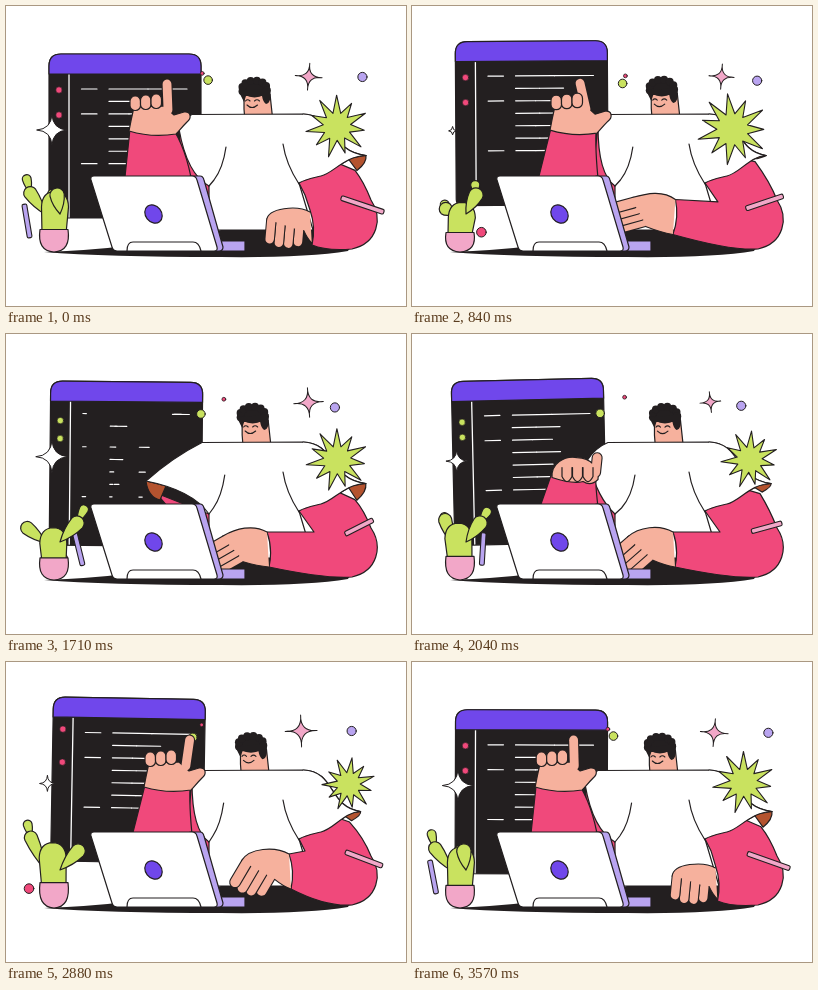
An HTML page that plays this animation: 400x300 px, repeating every 3600 ms.

```html
<!DOCTYPE html>
<html lang="en">
<head>
<meta charset="utf-8">
<title>Coder at a laptop</title>
<style>
html,body{margin:0;width:100%;height:100%;overflow:hidden;background:#fff}
svg{display:block;width:100vw;height:100vh}
</style>
</head>
<body>
<svg id="stage" viewBox="0 0 400 300" stroke-linejoin="round" stroke-linecap="round"></svg>
<script>
const LOOP = 3600, STEP = 30, RAD = Math.PI / 180;
const INK = '#231f20', PURPLE = '#7047eb', PINK = '#f0497b', ROSE = '#f2a7c8', LILAC = '#b9a4f0',
      SKIN = '#f6b19d', BROWN = '#b4532f', GREEN = '#c9e25f', WHITE = '#fff';
const stage = document.getElementById('stage');
let now = 0;

// motion: everything is a wave or a smooth bump in loop time
const mix = (a, b, u) => a + (b - a) * u;
const mixPt = (a, b, u) => [mix(a[0], b[0], u), mix(a[1], b[1], u)];
const off = (p, x, y) => [p[0] + x, p[1] + y];
const ease = u => { u = Math.max(0, Math.min(1, u)); return u * u * (3 - 2 * u); };
const wave = (mid, amp, peak, turns = 1) =>
  mid + amp * Math.cos((now / LOOP * 360 * turns - peak) * RAD);
const pulse = (center, width) => {
  const d = Math.abs(now - center);
  return ease(1 - Math.min(d, LOOP - d) / width);
};

// drawing
const fmt = v => +v.toFixed(2);
const join = parts => parts.map(p => Array.isArray(p) ? p.map(fmt).join(' ') : p).join(' ');
const shape = (d, fill, line = INK, w = 1.2) =>
  `<path d="${typeof d === 'string' ? d : join(d)}" fill="${fill}" stroke="${line}" stroke-width="${w}"/>`;
const curve = (d, line = INK, w = 1.2) => shape(d, 'none', line, w);
const seg = (a, b, color, w) => curve(['M', a, 'L', b], color, w);
const rod = (a, b, color, w) => seg(a, b, INK, w + 2.3) + seg(a, b, color, w);
const dot = (x, y, r, fill, w = 1) =>
  `<circle cx="${fmt(x)}" cy="${fmt(y)}" r="${fmt(r)}" fill="${fill}" stroke="${INK}" stroke-width="${w}"/>`;
const place = (x, y, deg, inner, scale = 1) =>
  `<g transform="translate(${fmt(x)} ${fmt(y)}) rotate(${fmt(deg)}) scale(${fmt(scale)})">${inner}</g>`;
const bar = (x, y, deg, len, color) => place(x, y, deg,
  `<rect x="${fmt(-len / 2)}" y="-2.4" width="${fmt(len)}" height="4.8" rx="1.5" fill="${color}" stroke="${INK}" stroke-width="1.1"/>`);

function sparkle(x, y, r, deg, fill, waist) {
  const q = r * waist;
  return place(x, y, deg, shape(['M', [0, -r], 'Q', [q, -q], [r, 0], 'Q', [q, q], [0, r],
    'Q', [-q, q], [-r, 0], 'Q', [-q, -q], [0, -r], 'Z'], fill, INK, 1));
}

function burst(x, y, r, deg) {
  const parts = [];
  for (let i = 0; i < 22; i++) {
    const a = (i * 360 / 22 + deg - 90) * RAD;
    const d = i % 2 ? r * .46 : r * (i % 4 ? .92 : 1.05);
    parts.push(i ? 'L' : 'M', [x + d * Math.cos(a), y + d * Math.sin(a)]);
  }
  return shape([...parts, 'Z'], GREEN, INK, 1.1);
}

function screen() {
  const x = wave(43.7, 3, 270, 2) + wave(0, -.7, 0, 2);
  const y = wave(41.5, 6.5, 0, 2), turn = wave(0, -1.7, 90, 2);
  const open = now < 1710 ? 1 - ease((now - 1230) / 330) : ease((now - 1640) / 420);
  const scroll = -10 * pulse(1200, 400);
  let code = '';
  for (let i = 0; i < 7; i++) {
    const h = 35 + scroll + 12.45 * i + mix(i < 2 ? -3 : 6, 0, open);
    const end = i ? 100 + 8 * (i % 2) : 138, mid = (60 + end) / 2;
    const line = (l, r) => seg([l, h], [r, h], WHITE, 1.2);
    const a = i ? 60 : 127, b = i % 2 ? a + 3 : 90 + 36 * (i === 0), w = Math.max(2, 13 - 2 * i);
    code += line(mix(a, 60, open), mix(a + w / 2, mid, open)) + line(mix(b, mid, open), mix(b + w, end, open));
    if (i % 4 === 2 || i === 0) code += line(32.5, mix(35, 48, open));
  }
  const lamp = now > 1500 && now < 2700 ? GREEN : PINK;
  const gap = 12.5 - 5 * pulse(2000, 800) + 4 * pulse(2880, 450);
  return place(x, y, 0, `<g transform="rotate(${fmt(turn)} 76 82)">` +
    shape('M0 12Q0 0 12 0H140Q152 0 152 12V158Q152 164 146 164H6Q0 164 0 158Z', INK) +
    seg([20, 20], [20, 163], WHITE, 1.3) + code +
    dot(10, 48.5 - gap, 3.2, lamp, .6) + dot(10, 48.5 + gap, 3.2, lamp, .6) +
    shape('M0 20V12Q0 0 12 0H140Q152 0 152 12V20Z', PURPLE) + '</g>');
}

function lobe(a, b, r) {
  const dx = b[0] - a[0], dy = b[1] - a[1], len = Math.hypot(dx, dy) || 1;
  const nx = -dy / len * r, ny = dx / len * r, mid = mixPt(a, b, .5);
  return shape(['M', a, 'Q', off(mid, nx * .9, ny * .9), off(b, nx, ny), `A${r} ${r} 0 0 0`, off(b, -nx, -ny),
    'Q', off(mid, -nx * .9, -ny * .9), a, 'Z'], GREEN);
}

function plant() {
  const top = [wave(48, 2, 60), wave(202.5, 8.5, 115)], rim = wave(223.5, 3, 90);
  const left = [wave(28, 11, 110, 2), wave(189.5, 14, 100)];
  const right = [wave(65, 10, 200) + wave(0, 7, 230, 2), 189];
  const bud = wave(7.5, 7.5, 330), sprout = wave(7, 7, 150);
  return bar(wave(47, 26, 180), 215, wave(-94, 16, 110, 2), wave(29, 5, 0, 2), LILAC) +
    dot(wave(47, 24, 105), wave(226, 2, 0), 4.8, PINK) +
    lobe(left, off(left, -bud * .25, -bud), 4.4) +
    lobe(right, off(right, wave(1, 6, 190), -sprout), 4.6) +
    lobe([40, 209], left, 6.6) +
    shape(['M', [36, 228], 'L', off(top, -13.5, 2), 'Q', off(top, -13, -13), off(top, 0, -13.5),
      'Q', off(top, 13, -13), off(top, 13.5, 2), 'L', [60, 228], 'Z'], GREEN) +
    lobe([54, 208], right, 7.2) +
    shape(['M', [34, rim], 'H 62 Q', [65, 245], [48, 246], 'Q', [31, 245], [34, rim], 'Z'], ROSE);
}

function head() {
  let curls = '';
  for (let i = 0; i < 8; i++) {
    const a = (165 + i * 29) * RAD;
    curls += `<circle cx="${fmt(246.5 + 12.5 * Math.cos(a))}" cy="${fmt(83 + 8.5 * Math.sin(a))}" r="3.9"/>`;
  }
  return place(wave(2, 6, 90, 2), wave(-1, 1, 0), 0,
    shape('M236 88V103L237 116H265L262 88Z', SKIN) +
    `<g fill="${INK}"><ellipse cx="246.5" cy="83" rx="13" ry="8.5"/>${curls}` +
    '<path d="M231 86L236 96L238 90H254Q255 96 258 98Q264 97 262 82Z"/></g>' +
    curve('M237.5 95Q239.5 92.500 242 95M246.500 95Q249 92.500 251.500 95M239 99Q244 104 249.500 99', INK, 1.1));
}

function leftHand(wrist) {
  const pressing = now > 850 && now < 2620, tap = pulse(2370, 500);
  const base = pressing ? mixPt([25, -4], [16, -12], tap) : [wave(16, -3, 90), -22];
  const tip = pressing ? mixPt([22, -30], [30, 4], tap) : [wave(15, -8, 90), -48];
  let out = seg(base, tip, INK, 11);
  out += shape(pressing
    ? 'M-21 -1C-22 -15 -9 -23 4 -21C18 -21 27 -10 25 1Q18 8 10 3Q0 6 -21 -1Z'
    : 'M-23 -1Q-21 -12 -18 -25L12 -26L22 -17L32 -20C39 -21 40 -14 35 -10C29 -4 27 -1 24 2Q0 6 -23 -1Z', SKIN);
  out += seg(base, tip, SKIN, 8.8);
  for (let i = 0; i < 3; i++) {
    const x = 10.5 * i - (pressing ? 11 : 22);
    out += pressing ? shape(`M${x} -11V-2Q${x + 5} 8 ${x + 10} -2V-11`, SKIN)
      : `<rect x="${x}" y="${-36 - i}" width="10.5" height="14.5" rx="5" fill="${SKIN}" stroke="${INK}" stroke-width="1.2"/>`;
  }
  return place(...wrist, 0, out);
}

// points along -x; curl 0 is an open hand, 1 has the fingers straight down
function rightHand(curl) {
  const a = curl * 85 * RAD, dir = [-Math.cos(a), Math.sin(a)], out = [-Math.sin(a), -Math.cos(a)];
  const knuckle = i => mixPt([-40 + 2 * i, -9 + 6.5 * i], [-44 + 10.5 * i, -7 + 3.5 * i], curl);
  const along = (p, v, d) => off(p, v[0] * d, v[1] * d);
  let fingers = '';
  for (let i = 3; i >= 0; i--) {
    const len = mix(27, 24, curl) - 2.5 * i * curl - 3 * (i % 3 === 0);
    fingers += rod(knuckle(i), along(knuckle(i), dir, len), SKIN, 9.6);
  }
  const top = along(knuckle(0), out, 5.4), low = along(knuckle(3), out, -5.4);
  const upper = ['C', [-14, -25], along(top, dir, -15), top], lower = ['Q', mixPt(low, [0, 20], .6), [2, 18]];
  return fingers + shape(['M', [0, -17], ...upper, 'L', knuckle(0), 'L', knuckle(3), 'L', low, ...lower, 'Z'], SKIN, 'none') +
    curve(['M', [0, -17], ...upper]) + curve(['M', low, ...lower]);
}

function person() {
  const reach = pulse(0, 500), drop = pulse(1710, 480), press = pulse(1200, 450) + pulse(2370, 450);
  const fist = pulse(0, 480), lift = pulse(510, 480), rest = pulse(2880, 500);

  // shirt and the pointing arm
  const shoulder = [196 - 10 * reach, 108.5];
  const hemA = off(mixPt([186, 120], [140, 147], drop), -13 * reach, 3 * reach), hemB = [203, 180];
  const hemBend = [186 - 5 * reach, mix(168, 156, drop)];
  const tip = [wave(357, 3, 0, 2), 149.5], neck = [297, 108], pit = [293, 177];
  const wrist = [161 - 15 * reach, 126 - 8 * press + 86 * drop];
  const foot = [122 - 5 * reach, 190], sway = wave(0, 4, 90, 2);
  const hem = ['C', [338, 150], [328, 167], [315, 170], 'S', [300, 173], pit];
  const sleeveTop = [[330, 109], [322, 145]];

  let out = shape(['M', off(hemA, 10 * drop, 12 * drop), 'L', hemB, 'L', [214, 192], 'H 178 Z'], PINK);
  if (drop > .05)
    out += shape(['M', hemA, 'Q', off(hemA, 2, 16 * drop), off(hemA, 14, 19 * drop), 'L', off(hemA, 20, 5), 'Z'], BROWN);
  out += shape(['M', hemA, 'Q', off(mixPt(hemA, shoulder, .5), -2, -4), shoulder, 'L', neck, 'C', ...sleeveTop, tip,
    ...hem, 'L', [307, 224], 'H 203 L', hemB, 'Q', hemBend, hemA, 'Z'], WHITE);
  out += curve(['M', [220 + sway, 141], 'Q', [217 + sway, 162], [208 + sway / 2, 174], 'L', hemB]);
  if (wrist[1] < 188)
    out += shape(['M', off(wrist, -22, -3), 'Q', off(wrist, 0, 5), off(wrist, 23, 0),
      'Q', [183, 150], [188, 190], 'L', foot, 'Z'], PINK);
  out += leftHand(wrist);

  // the other arm
  let hand = mixPt([261, 215], [283, 209], rest);
  hand = mixPt(mixPt(hand, [304, 221], fist), [262, 195], lift);
  const tilt = 32 * lift, typing = Math.max(0, 1 - fist - lift - rest);
  const curl = mix(.35 + .5 * pulse(2370, 500) + .35 * rest + .65 * fist, 0, lift);
  const turned = (x, y) => off(hand, x * Math.cos(tilt * RAD) - y * Math.sin(tilt * RAD),
    x * Math.sin(tilt * RAD) + y * Math.cos(tilt * RAD));
  const cuffA = turned(0, -17), cuffB = turned(2, 18);
  const gap = Math.max(0, wave(.45, .55, 310, 2));
  out += shape(['M', pit, 'L', mixPt([299, 189], [308, 198], typing), 'L', cuffA, 'Q', turned(6, 0), cuffB,
    'Q', [320, 245], [346, 243], 'C', [372, 237], [377, 212], [365, 194],
    'Q', [358, 176], off(tip, -11, 6 + 11 * gap), 'L', [315, 150], 'Z'], PINK);
  out += shape(['M', tip, 'Q', off(tip, 1, 9 * gap), off(tip, -9, 3 + 15 * gap), 'L', off(tip, -18, 3), 'Z'], BROWN);
  out += shape(['M', neck, 'C', ...sleeveTop, tip, ...hem], WHITE);
  out += shape('M276 140L292.500 175L300 112Z', WHITE, 'none') + curve('M277 138Q280 158 293 178');
  out += bar(wave(355, 3, 300), wave(196, 3, 0), wave(-3, 28, 320), wave(38, 7, 5), ROSE);
  return out + place(...hand, tilt, rightHand(curl), 1 - .12 * fist);
}

const desk = shape('M38 246Q130 243 215 224H330Q349 236 342 245Q300 252 215 251Q100 251 38 246Z', INK, 'none');
const laptop =
  shape('M208 235H239V245H208Z', LILAC) +
  shape('M184 170H194Q197 170 198 174L217 241Q217 245 213 245H204Z', LILAC) +
  shape('M88 170H186Q190 170 191 174L211 241Q212 245 208 245H111Q107 245 106 241L85 174Q84 170 88 170Z', WHITE) +
  curve('M121 245Q121 236 127 236H187Q193 236 195 245') +
  place(147.5, 208, -38, `<ellipse rx="8" ry="9.8" fill="${PURPLE}" stroke="${INK}" stroke-width="1.2"/>`);

function draw(t) {
  now = t;
  stage.innerHTML = desk + screen() + head() +
    dot(wave(206.5, 13, 142), wave(66, 4, 70), 1.9, PINK, .8) +
    dot(wave(197.5, 13.5, 70), wave(77, 3, 165), 4.3, GREEN) +
    person() +
    burst(wave(332, -11.5, 85), wave(123.3, 2.7, 175), wave(29.5, 4.5, 85), wave(0, -8, 85)) +
    sparkle(wave(302, 7.5, 85), wave(69.5, 1.5, 40), wave(13.5, -4.2, 90, 2), wave(0, 6, 35), ROSE, -.06) +
    sparkle(wave(43.3, 2.7, -10, 2), wave(124, 4.2, 90, 2), wave(10, 6.5, 325, 2), 0, WHITE, .06) +
    dot(wave(342.5, 14, 5), wave(72, 3, 110), 4.6, LILAC) +
    laptop + plant();
}

let start = null;
function tick(ms) {
  if (start === null) start = ms;
  draw(Math.floor((ms - start) % LOOP / STEP) * STEP);
  requestAnimationFrame(tick);
}
draw(0);
requestAnimationFrame(tick);
</script>
</body>
</html>
```
